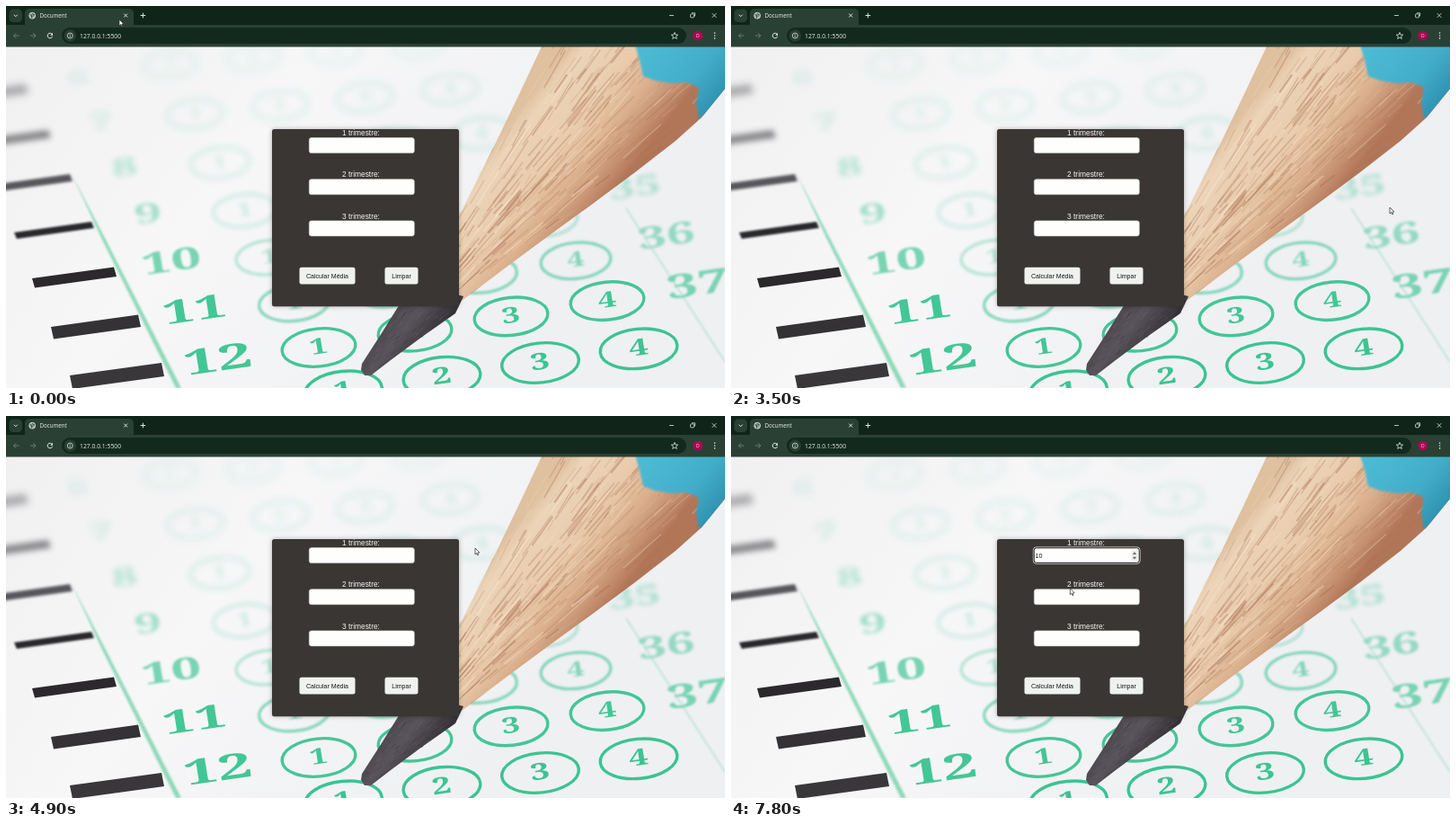
An HTML page with a canvas for the animation above (8 s loop, 800x425 px).

```html
<!DOCTYPE html>
<html lang="pt">
<head>
<meta charset="utf-8">
<title>Document</title>
<style>
html, body { margin: 0; width: 100%; height: 100%; overflow: hidden; background: #10241a; }
canvas { display: block; width: 800px; height: 425px; }
</style>
</head>
<body>
<canvas id="stage" width="800" height="425"></canvas>
<script>
const W = 800, H = 425, LOOP = 8000;
const ctx = document.getElementById('stage').getContext('2d');
const UI = '"Open Sans", "Noto Sans", sans-serif';
const ARIAL = '"Liberation Sans", Arial, sans-serif';
const TAU = Math.PI * 2;

// Pointer stops: [time, x, y, kind]
const stops = [
  [0, 126, 15, 'arrow'], [100, 262, 228, 'arrow'], [2800, 275, 238.5, 'arrow'],
  [3300, 420, 238, 'arrow'], [3400, 598, 232, 'arrow'], [3500, 733, 224, 'arrow'],
  [3600, 772, 211, 'arrow'], [3700, 788, 196, 'arrow'], [3900, 796, 182, 'arrow'],
  [4400, 799, 172, 'arrow'], [4700, 768, 162, 'arrow'], [4800, 650, 152, 'arrow'],
  [4900, 522, 147, 'arrow'], [5000, 444, 152, 'beam'], [5100, 398, 156, 'beam'],
  [5400, 386, 156, 'beam'], [5600, 381, 155.5, 'beam'], [7500, 379, 176, 'arrow'],
  [7800, 377.3, 191.8, 'arrow']
];
const entries = [[0, ''], [6700, '1'], [6900, '10']];
const carets = [[0, 0], [5800, 1], [6400, 0], [6700, 1], [7500, 0]];

const latest = (list, t) => list.filter(e => e[0] <= t).pop();

function poly(g, pts, fill) {
  g.beginPath();
  pts.forEach(p => g.lineTo(p[0], p[1]));
  g.closePath();
  if (fill) { g.fillStyle = fill; g.fill(); }
}

function line(g, pts, color, width) {
  g.beginPath();
  pts.forEach(p => g.lineTo(p[0], p[1]));
  g.strokeStyle = color;
  g.lineWidth = width;
  g.stroke();
}

function box(g, x, y, w, h, r, fill, stroke) {
  g.beginPath();
  g.roundRect(x, y, w, h, r);
  if (fill) { g.fillStyle = fill; g.fill(); }
  if (stroke) { g.strokeStyle = stroke; g.stroke(); }
}

function disc(g, x, y, r, fill, stroke, width = 0.9) {
  g.beginPath();
  g.arc(x, y, r, 0, TAU);
  if (fill) { g.fillStyle = fill; g.fill(); }
  if (stroke) { g.strokeStyle = stroke; g.lineWidth = width; g.stroke(); }
}

function text(g, s, x, y, size, family, color, align = 'left') {
  g.font = size + 'px ' + family;
  g.fillStyle = color;
  g.textAlign = align;
  g.fillText(s, x, y);
}

function random(seed) {
  return () => (seed = (seed * 16807) % 2147483647) / 2147483647;
}

// Digits lying on the sheet, seen in perspective
function printed(g, s, x, y, size, spread) {
  g.save();
  g.transform(spread, -0.2 * spread / 1.4, 0.16, 1, x, y);
  g.font = 'bold ' + size + 'px "Noto Serif", serif';
  g.textAlign = 'center';
  g.textBaseline = 'middle';
  g.fillText(s, 0, 0);
  g.restore();
}

function answerSheet(g) {
  const paper = g.createLinearGradient(0, 45, 500, 425);
  paper.addColorStop(0, '#f0f0f1');
  paper.addColorStop(0.45, '#f7f7f8');
  paper.addColorStop(1, '#eff0f2');
  g.fillStyle = paper;
  g.fillRect(0, 45, W, H - 45);

  // Rows of answer bubbles, the far ones out of focus
  const green = '#30c18c';
  const strength = [0.95, 0.9, 0.55, 0.32, 0.22, 0.2, 0.18, 0.16, 0.13];
  for (let k = -1; k < 8; k++) {
    g.save();
    g.globalAlpha = strength[k + 1];
    g.filter = `blur(${k < 1 ? 0.5 : k * 0.9}px)`;
    g.fillStyle = g.strokeStyle = green;
    g.lineWidth = 3.4;
    for (let i = 0; i < 4; i++) {
      const x = 348 - 27.5 * k + i * (107 - 2.5 * k);
      const y = 380 - 49 * k - 0.6 * k * k - i * (17.3 - 1.6 * Math.abs(k));
      g.beginPath();
      g.ellipse(x, y, 41 - 2 * k, 21 - k, -0.1, 0, TAU);
      g.stroke();
      printed(g, i + 1, x, y, 24 - k * 1.3, 1.5);
    }
    if (k >= 0 && k < 7) {
      g.globalAlpha = Math.min(1, strength[k + 1] * [1, 1.65, 2, 1.9, 1.7, 1.2, 1][k]);
      g.filter = `blur(${[0.4, 0.7, 1.2, 2.2, 3, 4, 4][k]}px)`;
      printed(g, 12 - k, 236 - 26 * k, 395 - 56 * k + k * k * 0.6, 38 - 2.6 * k, 1.8);
    }
    if (k >= 0 && k < 4) {
      g.globalAlpha = 0.62 - 0.14 * k;
      g.filter = `blur(${1 + k * 0.7}px)`;
      printed(g, 37 - k, 770 - 35 * k, 311 - 54 * k, 36 - 3 * k, 1.7);
    }
    g.restore();
  }
  g.save();
  g.filter = 'blur(0.9px)';
  poly(g, [[72, 185], [112, 262], [195, 425], [189, 425], [108, 262]], '#8fd9ba');
  g.globalAlpha = 0.5;
  line(g, [[690, 225], [800, 396]], '#86d7b6', 1.5);
  g.restore();

  // Timing marks: left, right, y of the middle, thickness, blur, tone
  [
    [-20, 24, 95, 10, 4, '#a4a4a7'], [-20, 49, 147, 9, 3, '#88888b'],
    [-14, 73, 197, 8, 1.8, '#57565a'], [10, 97, 249.5, 7, 0.9, '#29282b'],
    [30, 122, 302, 10.5, 0.7, '#2b292c'], [51, 149, 357, 13.5, 0.7, '#343235'],
    [72, 175, 411.5, 15, 0.7, '#39373a']
  ].forEach(([a, b, y, h, blur, color]) => {
    const d = (b - a) * 0.068;
    g.save();
    g.filter = `blur(${blur}px)`;
    poly(g, [[a - 1, y + d - h / 2], [b - 2, y - d - h / 2],
      [b + 1, y - d + h / 2], [a + 2, y + d + h / 2]], color);
    g.restore();
  });
}

function pencil(g) {
  const rnd = random(77);
  const wood = [[596, 45], [571, 98], [546, 150], [507, 228], [452, 310], [470, 328],
    [507, 328], [560, 288], [606, 254], [650, 222], [700, 185], [745, 150],
    [774, 124], [800, 92], [800, 45]];
  g.save();
  poly(g, wood);
  g.clip();
  const shade = g.createLinearGradient(540, 155, 650, 240);
  shade.addColorStop(0, '#dfc09f');
  shade.addColorStop(0.12, '#ecd4b8');
  shade.addColorStop(0.45, '#e9cbac');
  shade.addColorStop(0.7, '#d9ae8b');
  shade.addColorStop(0.9, '#c18b6b');
  shade.addColorStop(1, '#b17658');
  g.fillStyle = shade;
  g.fillRect(440, 45, 360, 300);
  // Grain running towards the point, densest along the middle
  for (let i = 0; i < 330; i++) {
    const a = -1.12 + (rnd() + rnd()) * 0.25, r = 110 + rnd() * 350, len = 12 + rnd() * 45;
    const cx = 408, cy = 400, bend = a + (rnd() - 0.5) * 0.012;
    g.globalAlpha = 0.12 + rnd() * 0.3;
    line(g, [
      [cx + r * Math.cos(a), cy + r * Math.sin(a)],
      [cx + (r + len) * Math.cos(bend), cy + (r + len) * Math.sin(bend)]
    ], rnd() < 0.65 ? '#a2674a' : '#f9e6cd', 0.7 + rnd() * 1.4);
  }
  g.globalAlpha = 1;
  g.filter = 'blur(0.8px)';
  const paint = g.createLinearGradient(710, 50, 790, 115);
  paint.addColorStop(0, '#4dbad3');
  paint.addColorStop(0.6, '#42adc9');
  paint.addColorStop(1, '#2d8fae');
  poly(g, [[699, 40], [705, 60], [709, 78], [722, 83], [741, 86], [758, 85],
    [771, 91], [768, 108], [771, 126], [805, 100], [805, 40]], paint);
  g.restore();

  const lead = g.createLinearGradient(425, 345, 470, 380);
  lead.addColorStop(0, '#4a464b');
  lead.addColorStop(0.4, '#59545b');
  lead.addColorStop(1, '#353136');
  g.save();
  g.filter = 'blur(0.4px)';
  poly(g, [[452, 310], [436, 335], [416, 367], [396, 398], [395, 405], [399, 411],
    [406, 411], [428, 394], [463, 368], [500, 342], [509, 323], [490, 318]], lead);
  g.clip();
  for (let i = 0; i < 200; i++) {
    const x = 395 + rnd() * 110, y = 325 + rnd() * 88;
    g.globalAlpha = 0.25;
    line(g, [[x, y], [x + 5, y - 5]], rnd() < 0.5 ? '#858186' : '#211f23', 0.9);
  }
  g.restore();
}

function browser(g) {
  const bar = '#2b4034', dark = '#10241a', pale = '#dbe7df', dim = '#70837a';
  g.fillStyle = dark;
  g.fillRect(0, 0, W, 22);
  g.fillStyle = bar;
  g.fillRect(0, 21, W, 24.5);
  box(g, 3.5, 3.5, 14.5, 14.5, 4.5, bar);
  line(g, [[8.8, 9.7], [10.8, 11.7], [12.8, 9.7]], pale, 1);
  box(g, 21, 3, 121, 22, [5, 5, 0, 0], bar);

  disc(g, 29.2, 10.7, 3.4, '#91a198', pale);
  line(g, [[26.7, 9.4], [29, 10.6], [28.4, 13.5]], '#263a2f', 0.9);
  line(g, [[29.5, 7.9], [30.5, 9.8], [32, 10]], '#263a2f', 0.9);
  text(g, 'Document', 37.5, 13, 6.2, UI, '#eef4f0');
  const cross = (x, y, r, w) => {
    line(g, [[x - r, y - r], [x + r, y + r]], pale, w);
    line(g, [[x + r, y - r], [x - r, y + r]], pale, w);
  };
  cross(133.2, 10.5, 1.9, 1);
  line(g, [[149.6, 10.5], [155.2, 10.5]], pale, 1);
  line(g, [[152.4, 7.7], [152.4, 13.3]], pale, 1);
  line(g, [[738, 10.5], [743, 10.5]], pale, 0.8);
  g.lineWidth = 0.8;
  box(g, 761.6, 8.9, 3.9, 3.9, 0.8, null, pale);
  line(g, [[763, 7.8], [766.6, 7.8], [766.6, 11.4]], pale, 0.8);
  cross(788, 10.5, 2.4, 0.8);

  const arrow = (x, d) => {
    line(g, [[x - 3, 33], [x + 3, 33]], dim, 0.9);
    line(g, [[x + d * 0.2, 30.2], [x + d * 3, 33], [x + d * 0.2, 35.8]], dim, 0.9);
  };
  arrow(11.5, -1);
  arrow(30, 1);
  g.beginPath();
  g.arc(49, 33, 2.8, 0.3, 5.5);
  g.strokeStyle = pale;
  g.lineWidth = 1;
  g.stroke();
  poly(g, [[52, 29.8], [52, 32.7], [49.2, 32.7]], pale);

  box(g, 62, 24, 695, 18, 9, '#13291e');
  disc(g, 71.3, 33, 6.7, '#2a3d32');
  disc(g, 71.3, 33, 3, null, pale, 0.8);
  line(g, [[71.3, 32.6], [71.3, 34.8]], pale, 0.8);
  line(g, [[71.3, 31.1], [71.3, 31.9]], pale, 0.8);
  text(g, '127.0.0.1:5500', 82, 35.6, 6.8, UI, '#e6efe9');

  const star = [];
  for (let i = 0; i < 11; i++) {
    const a = -Math.PI / 2 + i * Math.PI / 5, r = i % 2 ? 1.7 : 3.9;
    star.push([744 + r * Math.cos(a), 33.3 + r * Math.sin(a)]);
  }
  line(g, star, pale, 0.8);
  disc(g, 769.7, 33, 5.3, '#ad0753');
  text(g, 'D', 769.7, 35.1, 5.4, UI, '#f3d9e4', 'center');
  [30.1, 33, 35.9].forEach(y => disc(g, 788.6, y, 0.8, pale));
}

function form(g) {
  g.save();
  g.shadowColor = 'rgba(0,0,0,.3)';
  g.shadowBlur = 5;
  box(g, 296, 137, 208, 197.3, 2.5, '#3a3634');
  g.restore();
  for (let i = 0; i < 3; i++) {
    const y = i * 46.15;
    text(g, `${i + 1} trimestre:`, 395, 144.3 + y, 8.4, ARIAL, '#f6f6f5', 'center');
    g.lineWidth = 0.6;
    box(g, 337.3, 146.6 + y, 117, 17, 2.6, '#fefffc', '#cfd0cd');
  }
  box(g, 326.5, 290.8, 62, 18.8, 2.3, '#eff2ef');
  box(g, 421.5, 290.8, 37, 18.8, 2.3, '#eff2ef');
  text(g, 'Calcular Média', 357.5, 302.7, 7.05, ARIAL, '#171a18', 'center');
  text(g, 'Limpar', 440, 302.7, 7.05, ARIAL, '#171a18', 'center');
}

function focused(g, t) {
  if (t >= 5800) {
    g.lineWidth = 0.8;
    box(g, 336.3, 145.9, 118.8, 18.4, 3.3, null, '#f0f0ee');
    g.lineWidth = 1;
    box(g, 337.2, 146.8, 117, 16.6, 2.6, '#fefffc', '#161514');
  }
  if (t >= 5000) {
    box(g, 445.5, 149.3, 7, 11.8, 0, '#eeefec');
    poly(g, [[446.8, 153.9], [451.2, 153.9], [449, 151.2]], '#686967');
    poly(g, [[446.8, 156.7], [451.2, 156.7], [449, 159.4]], '#686967');
  }
  const value = latest(entries, t)[1];
  text(g, value, 338.5, 157.6, 7.05, ARIAL, '#151515');
  if (latest(carets, t)[1]) {
    const x = 338.9 + g.measureText(value).width;
    line(g, [[x, 151.2], [x, 159]], '#1b1b1b', 0.8);
  }
}

function pointer(g, t) {
  const [, x, y, kind] = latest(stops, t);
  g.save();
  g.translate(x, y);
  if (kind === 'beam') {
    line(g, [[-1.6, -3.7], [1.6, -3.7]], '#444', 0.7);
    line(g, [[0, -3.7], [0, 3.7]], '#444', 0.8);
    line(g, [[-1.6, 3.7], [1.6, 3.7]], '#444', 0.7);
  } else {
    poly(g, [[0, 0], [0, 7], [1.6, 5.6], [2.7, 8], [3.7, 7.5], [2.7, 5.2], [4.9, 5]], '#fff');
    g.strokeStyle = '#252525';
    g.lineWidth = 0.7;
    g.stroke();
  }
  g.restore();
}

const still = document.createElement('canvas');
still.width = W;
still.height = H;
const base = still.getContext('2d');
[answerSheet, pencil, browser, form].forEach(draw => draw(base));

function frame(now) {
  const t = now % LOOP;
  ctx.drawImage(still, 0, 0);
  focused(ctx, t);
  pointer(ctx, t);
  requestAnimationFrame(frame);
}
frame(0);
</script>
</body>
</html>
```
